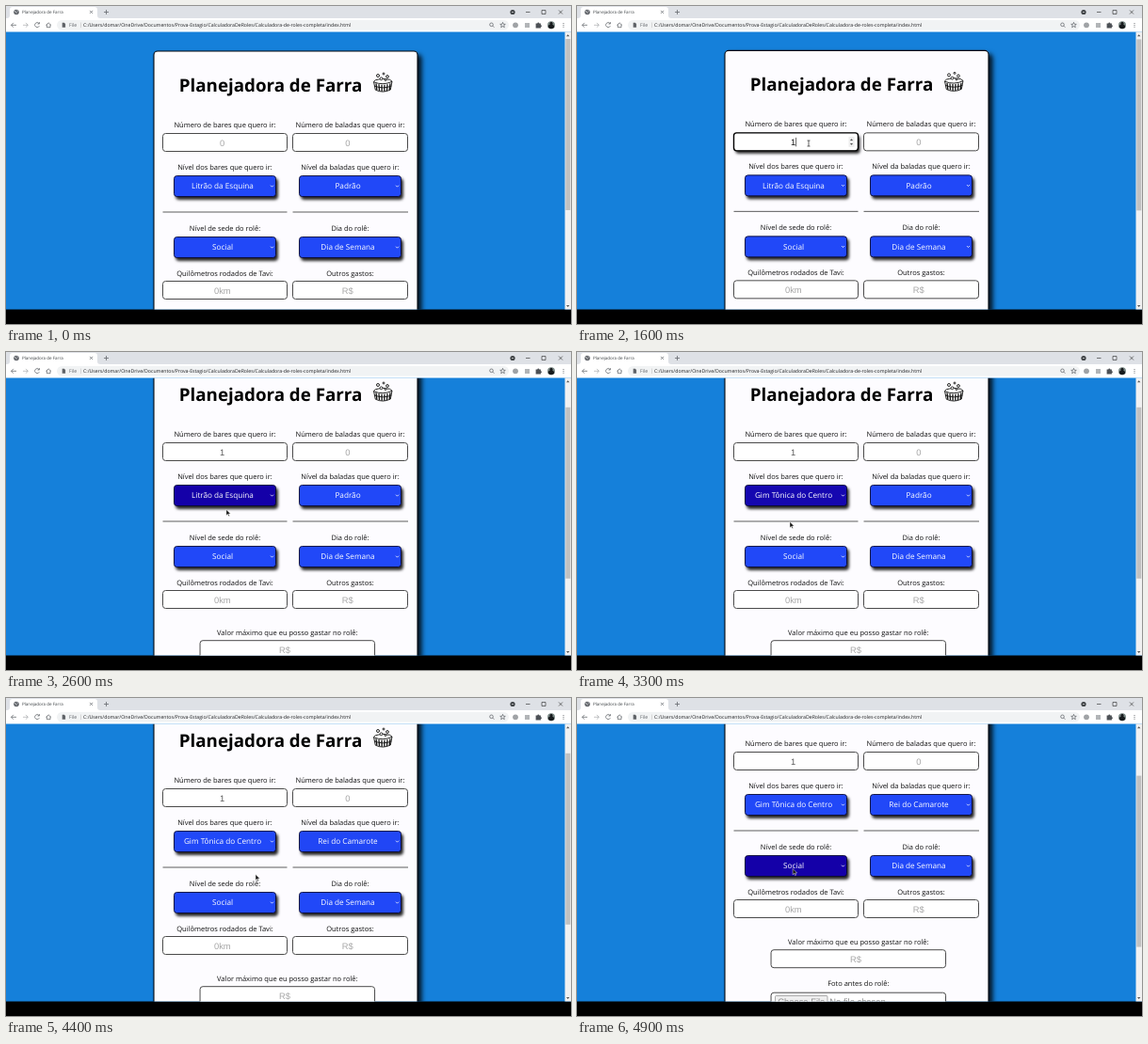
Write an HTML page that moves like this. It is 600 px wide and 338 px high and loops after 5 s.

```html
<!DOCTYPE html>
<html lang="pt-BR">
<head>
<meta charset="utf-8">
<title>Planejadora de Farra</title>
<style>
html, body { margin: 0; width: 100%; height: 100%; overflow: hidden; background: #000; }
svg { display: block; width: 100%; height: 100%; }
text { font-family: "Open Sans", "Noto Sans", sans-serif; text-rendering: geometricPrecision; }
.label { font-size: 7.5px; fill: #111; text-anchor: middle; }
.value { font: 9.375px "Liberation Sans", Arial, sans-serif; fill: #a6a6a6; text-anchor: middle; }
.pick { font-size: 8.2px; fill: #fff; text-anchor: middle; }
.title { font-size: 18.75px; font-weight: 700; text-anchor: middle; }
.field { fill: #fff; stroke: #4a4a4a; stroke-width: 1; }
.lift { filter: drop-shadow(2.5px 3px 1.6px rgba(0,0,0,.85)); }
.line { fill: none; stroke: #5f6368; stroke-width: .75; }
</style>
</head>
<body>
<svg id="stage" viewBox="0 0 600 338"></svg>
<script>
const LOOP = 5000;
const BLUE = [33, 72, 248], NAVY = [20, 0, 168];
const LEFT = 232.5, RIGHT = 365.5;

const label = (x, y, s) => `<text class="label" x="${x}" y="${y}">${s}</text>`;

const box = (x, y, w, id = '') =>
  `<rect ${id} class="field" x="${x - w / 2}" y="${y}" width="${w}" height="19" rx="3"/>`;

const input = (x, y, w, hint) =>
  box(x, y, w) + `<text class="value" x="${x - 2.7}" y="${y + 13}">${hint}</text>`;

const select = (id, x, y, s) => `
  <rect id="${id}" class="lift" x="${x - 54}" y="${y}" width="108" height="22" rx="3" stroke="#0a0a30" stroke-width=".9"/>
  <text id="${id}Text" class="pick" x="${x - 2.5}" y="${y + 13.7}">${s}</text>
  <path d="M${x + 48.5} ${y + 10.2}l1.5 1.5 1.5-1.5" fill="none" stroke="#fff" stroke-width=".8"/>`;

const rule = (x, w) => `<path d="M${x} 219h${w}" stroke="#333" stroke-width=".8"/>`;

function browserBar() {
  return `
  <rect width="600" height="13" fill="#dee1e6"/>
  <path d="M1 13q3 0 3-3V4q0-3 3-3h87q3 0 3 3v6q0 3 3 3z" fill="#fff"/>
  <circle cx="11" cy="6.5" r="2.8" fill="#5f6368"/>
  <path d="M8.8 5.5l2 .6.4 1.7M11.5 4.2l1.6 1.5" stroke="#fff" stroke-width=".6" fill="none"/>
  <text x="17" y="8.3" font-size="4.53" fill="#3c4043">Planejadora de Farra</text>
  <path class="line" d="M89 4.9l3 3m0-3l-3 3M104 6.5h5m-2.5-2.5v5"/>
  <circle cx="538" cy="6.5" r="2.6" fill="#3c4043"/>
  <path d="M537 6l1 1.1 1-1.1" fill="none" stroke="#fff" stroke-width=".6"/>
  <path d="M552 6.5h4.5M569 4.5h4v4h-4zM587 4.5l4 4m0-4l-4 4" fill="none" stroke="#222" stroke-width=".6"/>
  <rect y="13" width="600" height="14.5" fill="#fff"/>
  <path class="line" d="M11 20.3H5.5m2.4-2.4l-2.4 2.4 2.4 2.4M35.1 18.6a2.5 2.5 0 1 0 .3 2.5m0-4v1.9h-1.9M42.5 20.4l2.7-2.5 2.7 2.5m-4.5-.7v3h3.6v-3"/>
  <path class="line" d="M18 20.3h5.3m-2.4-2.4l2.4 2.4-2.4 2.4" opacity=".5"/>
  <rect x="54" y="15" width="480" height="10.6" rx="5.3" fill="#f1f3f4"/>
  <path d="M59.7 17.7h2.1l1.3 1.3v3.8h-3.4z" fill="#5f6368"/>
  <text x="67" y="22.2" font-size="5.19" fill="#5f6368">File</text>
  <path d="M79.5 17.5v5.6" stroke="#bbb" stroke-width=".5"/>
  <text x="82" y="22.2" font-size="5.19" fill="#202124">C:/Users/domar/OneDrive/Documentos/Prova-Estagio/CalculadoraDeRoles/Calculadora-de-roles-completa/index.html</text>
  <circle class="line" cx="515.5" cy="19.8" r="1.8"/><path class="line" d="M516.8 21.1l1.6 1.6"/>
  <path class="line" d="M527.5 17.4l.8 1.9 2 .1-1.6 1.3.6 2-1.8-1.1-1.8 1.1.6-2-1.6-1.3 2-.1z"/>
  <circle cx="541" cy="20.3" r="2.9" fill="#a0a3a6"/>
  <rect x="551" y="18" width="5" height="5" fill="#b2b5b8"/>
  <path d="M562.6 18.6h1.7a1 1 0 0 1 2 0h1.6v1.6a1 1 0 0 1 0 2v1.4h-5.3z" fill="#4d5156"/>
  <circle cx="579" cy="20.2" r="4" fill="#7c8a87"/>
  <path d="M575.6 22.3q.4-2.5 2.2-2.7a1.6 1.6 0 1 1 2.4 0q2 .4 2.1 2.8a4 4 0 0 1-6.7-.1z" fill="#171b1d"/>
  <path d="M592 18v.9m0 1v.9m0 1v.9" stroke="#5f6368" stroke-width="1"/>`;
}

// Line drawing of a round basket with bubbles on top
function basket() {
  let slats = '';
  for (let i = 0; i < 6; i++) slats += `M${393 + i * 3} ${82 + Math.sin((i + .5) * Math.PI / 6) * 1.7}l${(2.5 - i) * .35} 7`;
  const bubbles = [[395, 74, 1.5], [401, 72, 1], [405, 75, 1.4], [398.5, 77.3, 1.4], [403, 78.5, 1]];
  return `<g fill="none" stroke="#111" stroke-width=".9">
    <path d="M390.5 80.5q1.5-2.5 5-2.4 4-2 8-.2 4.500-.5 6.500 2.200L408.300 89q-8 4-16 .2z" fill="#fff"/>
    <path d="M390.500 80.800q9.500 4 19.500-.4M391.300 85q9 3.700 18 0"/><path d="${slats}" stroke-width="1.300"/>
    ${bubbles.map(([x, y, r]) => `<circle cx="${x}" cy="${y}" r="${r}" fill="#fff"/>`).join('')}
  </g>`;
}

function form() {
  return `
  <rect x="157" y="48" width="280" height="440" rx="4" fill="#fdfcff" stroke="#05080f" stroke-width="1.1"
    style="filter:drop-shadow(4px 4px 2.5px rgba(0,0,0,.85))"/>
  <text class="title" x="281" y="91">Planejadora de Farra</text>${basket()}
  ${label(LEFT, 129, 'Número de bares que quero ir:')}${label(RIGHT, 129, 'Número de baladas que quero ir:')}
  <rect id="glow" class="lift" x="166.5" y="135.5" width="132" height="19" rx="3"/>
  ${box(LEFT, 135.5, 132, 'id="bars"')}
  <text id="count" class="value" x="229.7" y="148.5">0</text>
  <path id="caret" stroke="#000" stroke-width=".6"/>
  <g id="spin"><rect x="288.5" y="139.500" width="6" height="11" fill="#eee"/>
    <path d="M290 143.600l1.500-1.700 1.500 1.700zM290 146.600l1.500 1.700 1.500-1.700z" fill="#444"/></g>
  ${input(RIGHT, 135.5, 122, '0')}
  ${label(LEFT, 174, 'Nível dos bares que quero ir:')}${label(RIGHT, 174, 'Nível da baladas que quero ir:')}
  ${select('barLevel', LEFT, 180.5, '')}${select('clubLevel', RIGHT, 180.5, '')}
  ${rule(166.5, 132)}${rule(304.5, 122.5)}
  ${label(LEFT, 239, 'Nível de sede do rolê:')}${label(RIGHT, 239, 'Dia do rolê:')}
  ${select('thirst', LEFT, 245.5, 'Social')}${select('day', RIGHT, 245.5, 'Dia de Semana')}
  ${label(LEFT, 286.7, 'Quilômetros rodados de Tavi:')}${label(RIGHT, 286.7, 'Outros gastos:')}
  ${input(LEFT, 292.5, 132, '0km')}${input(RIGHT, 292.5, 122, 'R$')}
  ${label(298.8, 339.7, 'Valor máximo que eu posso gastar no rolê:')}
  ${input(298.8, 345.7, 185.500, 'R$')}
  ${label(298.8, 384, 'Foto antes do rolê:')}
  ${box(298.8, 391.200, 185.500)}
  <rect x="210.5" y="394.5" width="55.500" height="13" rx="1" fill="#efefef" stroke="#777" stroke-width=".6"/>
  <text class="value" x="238.3" y="404.2" style="fill:#888">Choose File</text>
  <text class="value" x="298" y="404.2" style="fill:#888">No file chosen</text>`;
}

document.getElementById('stage').innerHTML = `
  <clipPath id="view"><rect y="27.5" width="600" height="295"/></clipPath>
  <rect width="600" height="338" fill="#000"/>
  <rect y="27" width="600" height="295.500" fill="#1580da"/>
  <g clip-path="url(#view)"><g id="page">${form()}</g></g>
  <rect x="593.5" y="27.5" width="6.500" height="295" fill="#f1f1f1"/>
  <path d="M595 32.300l1.700-2 1.700 2zM595 318l1.700 2 1.700-2z" fill="#555"/>
  <rect id="thumb" x="594.3" y="35" width="5" height="182" fill="#c1c1c1"/>
  ${browserBar()}
  <path id="beam" d="M-1.500-3h3m-1.500 0v6m-1.500 0h3" fill="none" stroke="#222" stroke-width=".7"/>
  <path id="arrow" d="M0 0v6.200l1.500-1.300 1 2.200 1-.4-1-2.200h2z" fill="#111" stroke="#fff" stroke-width=".45"/>`;

const $ = {};
document.querySelectorAll('[id]').forEach(e => $[e.id] = e);

const ramp = (t, start, length) => {
  const p = Math.min(1, Math.max(0, (t - start) / length));
  return p * p * (3 - 2 * p);
};
const pulse = (t, on, off, length) => ramp(t, on, length) - ramp(t, off, length);

// Pointer stops: time, x, y
const STOPS = [
  [100, 300, 278], [350, 299, 208], [480, 291, 172], [650, 246, 146], [1800, 246, 146],
  [1950, 244.500, 153.500], [2300, 244.500, 153.500], [2700, 232, 170], [3000, 226, 180.500], [3300, 226, 180.500],
  [3600, 345, 156], [3750, 350, 156], [4000, 352, 180], [4170, 350, 182], [4400, 265, 187.500],
  [4560, 230, 181.500], [5000, 229, 181.500]
];

function pointer(t) {
  let i = 1;
  while (i < STOPS.length - 1 && t > STOPS[i][0]) i++;
  const [t0, x0, y0] = STOPS[i - 1], [t1, x1, y1] = STOPS[i];
  const p = ramp(t, t0, t1 - t0);
  return [x0 + (x1 - x0) * p, y0 + (y1 - y0) * p];
}

function shade(el, p) {
  el.setAttribute('fill', `rgb(${BLUE.map((c, i) => Math.round(c + (NAVY[i] - c) * p))})`);
}

function draw(t) {
  const scroll = 39 * (ramp(t, 1582, 250) + ramp(t, 4580, 290));
  $.page.setAttribute('transform', `translate(0 ${-scroll})`);
  $.thumb.setAttribute('y', 35 + scroll * .61);

  const focus = pulse(t, 700, 1800, 150);
  const typed = t >= 1300;
  $.glow.setAttribute('opacity', focus);
  $.bars.style.stroke = `rgb(${Array(3).fill(Math.round(74 * (1 - focus)))})`;
  $.bars.style.strokeWidth = 1 + focus * .4;
  $.count.textContent = typed ? '1' : '0';
  $.count.style.fill = typed ? (focus > .5 ? '#111' : '#555') : (focus > .5 ? '#777' : '#a6a6a6');
  $.caret.setAttribute('d', `M${typed ? 232.600 : 230} 140.500v9.500`);
  $.caret.setAttribute('opacity', t >= 800 && t < 1800 ? 1 : 0);
  $.spin.setAttribute('opacity', pulse(t, 600, 1850, 230));

  shade($.barLevel, pulse(t, 1720, 3250, 260));
  shade($.clubLevel, pulse(t, 3520, 4170, 260));
  shade($.thirst, ramp(t, 4720, 180));
  shade($.day, 0);
  $.barLevelText.textContent = t < 3250 ? 'Litrão da Esquina' : 'Gim Tônica do Centro';
  $.clubLevelText.textContent = t < 4170 ? 'Padrão' : 'Rei do Camarote';

  const [x, y] = pointer(t), typing = t >= 600 && t < 1700;
  for (const id of ['beam', 'arrow']) {
    $[id].setAttribute('transform', `translate(${x} ${y})`);
    $[id].setAttribute('opacity', t >= 100 && typing === (id === 'beam') ? 1 : 0);
  }
}

const began = performance.now();
function tick() {
  draw((performance.now() - began) % LOOP);
  requestAnimationFrame(tick);
}
tick();
</script>
</body>
</html>
```
